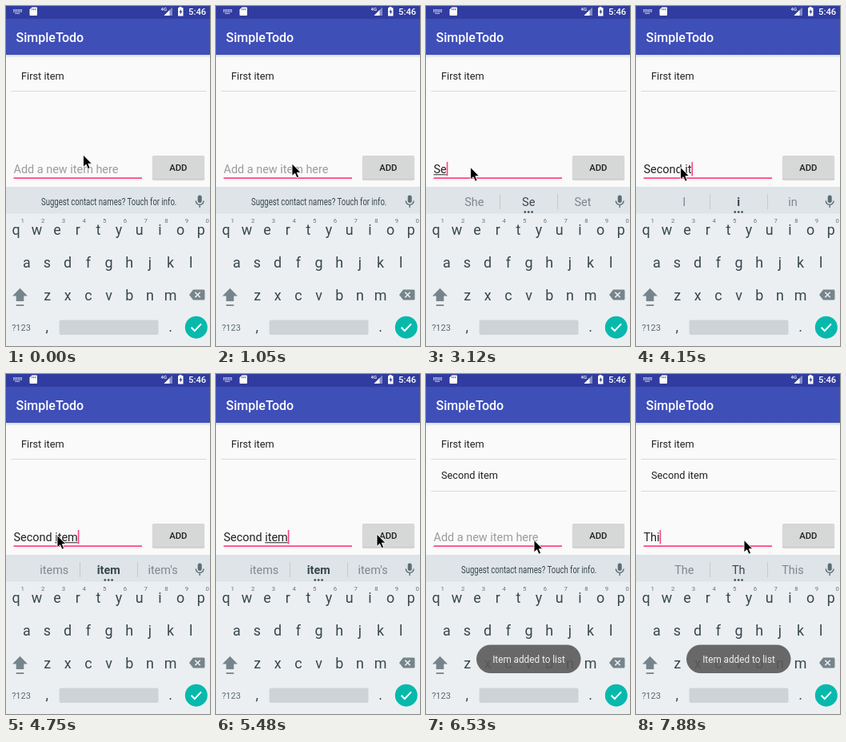
An HTML page for the animation above (8000 ms loop, 255 by 425 pixels).

```html
<!DOCTYPE html>
<html lang="en">
<head>
<meta charset="utf-8">
<title>Todo list</title>
<style>
html, body { margin: 0; width: 100%; height: 100%; overflow: hidden; background: #fafafa; }
svg { display: block; width: 100vw; height: 100vh; font-family: Roboto, sans-serif; }
text { white-space: pre; }
.mid { text-anchor: middle; }
.med { font-weight: 500; }
.item { font-size: 12.75px; fill: #212121; }
.field { font-size: 14.45px; }
.key { font-size: 17.9px; fill: #37474f; text-anchor: middle; }
.num { font-size: 7.8px; fill: #66757d; text-anchor: middle; }
</style>
</head>
<body>
<svg viewBox="0 0 255 425">
  <defs>
    <linearGradient id="shade" x2="0" y2="1">
      <stop stop-opacity=".14"/><stop offset="1" stop-opacity="0"/>
    </linearGradient>
  </defs>
  <rect width="255" height="425" fill="#fafafa"/>
  <rect y="61" width="255" height="4" fill="url(#shade)"/>
  <rect width="255" height="61" fill="#3f4fb8"/>
  <rect width="255" height="16" fill="#303c9f"/>

  <!-- status bar -->
  <g fill="#fff">
    <path d="M9 5h11M9 7.200h11M11.500 9.400h6" stroke="#fff" stroke-opacity=".85" stroke-width="1.300" stroke-dasharray="1.400 .6"/>
    <path d="M32.500 1.500H38q1 0 1 1V11q0 1-1 1H30.500q-1 0-1-1V4.500Z"/>
    <path d="M32.600 3.200v2M34.600 3.200v2M36.600 3.200v2" stroke="#303c9f" stroke-width=".9"/>
    <path d="M208 1.500V12H197.500Z" fill-opacity=".4"/>
    <path d="M204.500 5V12H197.500Z"/>
    <text x="193.500" y="6" font-size="6" class="med">4G</text>
    <path d="M216.500 1h3v1.200h2V12.500h-6.500V2.200h1.500Z"/>
    <path d="M218.800 3.800l-2.300 4h1.500v3l2.300-4.200h-1.500Z" fill="#303c9f"/>
    <text x="228" y="11" font-size="11.3" class="med">5:46</text>
    <text x="12.500" y="45" font-size="16" class="med">SimpleTodo</text>
  </g>

  <!-- list -->
  <text x="19" y="92" class="item">First item</text>
  <rect x="6.500" y="106" width="244" height="1" fill="#d8d8d8"/>
  <g id="second">
    <text x="19" y="131" class="item">Second item</text>
    <rect x="6.500" y="146" width="244" height="1" fill="#d8d8d8"/>
  </g>

  <!-- entry field -->
  <text id="hint" x="9.500" y="208.500" class="field" fill="#9b9b9b">Add a new item here</text>
  <text id="entry" x="9.500" y="208.500" class="field" fill="#212121"></text>
  <rect id="under" y="210.300" height="1" fill="#212121"/>
  <rect x="9.500" y="214.300" width="160.500" height="1.700" fill="#ff4081"/>
  <rect id="caret" y="195" width="1.600" height="17.500" fill="#ff4081"/>
  <rect x="182.700" y="188.200" width="65.600" height="30" rx="2" fill="#000" fill-opacity=".1"/>
  <rect x="183" y="187.300" width="65" height="30" rx="1.800" fill="#000" fill-opacity=".14"/>
  <rect x="183" y="187" width="65" height="29.500" rx="1.800" fill="#d6d7d7"/>
  <text x="215.300" y="206" font-size="11.3" class="mid med" fill="#212121">ADD</text>

  <!-- keyboard -->
  <rect y="226" width="255" height="199" fill="#eceff1"/>
  <rect y="226" width="255" height="33.500" fill="#dee4e7"/>
  <text id="ask" class="mid" transform="translate(128.700 249.200) scale(.737 1)" font-size="13" fill="#37474f">Suggest contact names? Touch for info.</text>
  <g id="words">
    <path d="M92.500 235v19M164.500 235v19" stroke="#c3ccd1"/>
    <text class="mid field" x="60.300" y="250" fill="#7b888f"></text>
    <text class="mid field" x="128.200" y="250" fill="#37474f"></text>
    <text class="mid field" x="196" y="250" fill="#7b888f"></text>
    <g fill="#37474f">
      <circle cx="123.800" cy="257.500" r="1.350"/><circle cx="128.200" cy="257.500" r="1.350"/><circle cx="132.600" cy="257.500" r="1.350"/>
    </g>
  </g>
  <rect x="239.700" y="236.500" width="5" height="9.500" rx="2.500" fill="#5d6d75"/>
  <path d="M237.300 243.500a4.900 4.900 0 0 0 9.800 0M242.200 248.400v3.600" fill="none" stroke="#5d6d75" stroke-width="1.400"/>
  <g id="keys"></g>
  <g fill="#76858c">
    <path d="M17.500 352.800L27 362.500H22.300V369H12.700V362.500H8Z"/>
    <rect x="12.700" y="373.200" width="9.600" height="1.800"/>
    <path d="M234 354.500H247q1.500 0 1.500 1.500V366q0 1.500-1.500 1.500H234L229 361Z"/>
  </g>
  <path d="M236.300 357.800l6.400 6.400M242.700 357.800l-6.400 6.400" stroke="#eceff1" stroke-width="1.600"/>
  <text x="19" y="405.500" font-size="11" class="mid" fill="#5a6a72">?123</text>
  <rect x="66.500" y="392.500" width="124" height="18.500" rx="2" fill="#cdd3d7"/>
  <circle cx="237.800" cy="401.700" r="14" fill="#07b9ac"/>
  <path d="M231.600 401.800l4.200 4.200 8.200-8.600" fill="none" stroke="#fff" stroke-width="2"/>

  <g id="toast">
    <rect x="63" y="338.500" width="130.500" height="35.500" rx="17.750" fill="#5a5a5a" fill-opacity=".9"/>
    <text class="mid" transform="translate(128.500 361) scale(.92 1)" font-size="12.75" fill="#f0f0f0">Item added to list</text>
  </g>
  <path id="mouse" d="M0 0V15.500L3.600 12.200 6 17.700 8.600 16.600 6.300 11.200H11Z" fill="#000" stroke="#fff" stroke-width=".9"/>
</svg>
<script>
const LOOP = 8000;
const $ = id => document.getElementById(id);
const slots = $('words').querySelectorAll('text');

function addKey(label, x, y, cls = 'key') {
  const el = document.createElementNS('http://www.w3.org/2000/svg', 'text');
  el.setAttribute('class', cls);
  el.setAttribute('x', x);
  el.setAttribute('y', y);
  el.textContent = label;
  $('keys').append(el);
}
const addRow = (letters, x, y, cls) =>
  [...letters].forEach((c, i) => addKey(c, x + i * 25.68, y, cls));

addRow('qwertyuiop', 12.7, 286);
addRow('asdfghjkl', 25.8, 327);
addRow('zxcvbnm', 51.6, 367.5);
addRow('1234567890', 20.6, 271, 'num');
addKey(',', 51.3, 407);
addKey('.', 205.7, 407);

// time, text, caret shown, start of underlined word (-1: none), suggestions
const typing = [
  [0, '', 0, -1, ''], [450, '', 1, -1, ''], [1050, '', 0, -1, ''],
  [1490, '', 1, -1, ''], [1940, '', 0, -1, ''], [2530, '', 1, -1, ''],
  [2680, 'S', 1, -1, ''], [2830, 'S', 1, 0, 'So S She'],
  [2970, 'Se', 1, -1, 'So S She'], [3120, 'Se', 1, 0, 'She Se Set'],
  [3270, 'Sec', 1, 0, 'See Sec Set'], [3410, 'Secon', 1, 0, 'See Sec Set'],
  [3560, 'Second', 1, 0, 'Sec *Second Set'], [3710, 'Second ', 1, -1, 'Sec *Second Set'],
  [4010, 'Second i', 1, 7, 'I *i in'], [4150, 'Second it', 1, -1, 'I *i in'],
  [4300, 'Second ite', 1, 7, 'it *item its'], [4450, 'Second item', 1, 7, "items *item item's"],
  [5050, 'Second item', 0, 7, "items *item item's"], [5480, 'Second item', 1, 7, "items *item item's"],
  [5780, '', 1, -1, ''], [6380, '', 0, -1, ''], [6830, '', 1, -1, ''],
  [7280, 'T', 1, -1, ''], [7430, 'T', 1, 0, 'To T The'],
  [7580, 'Th', 1, -1, 'To T The'], [7730, 'Th', 1, 0, 'The Th This'],
  [7880, 'Thi', 1, -1, 'The Th This']
];
// time, x, y
const moves = [
  [0, 96.5, 186], [1050, 95, 197], [1200, 84, 217], [1340, 70, 226],
  [1490, 60, 213], [1640, 55.5, 201.5], [4750, 64, 201.5], [4900, 108, 202],
  [5050, 164, 202], [5190, 199, 202], [5480, 201, 200],
  [6080, 196, 201], [6230, 168, 205], [6380, 143, 207], [6530, 135, 207.5]
];
// time, opacity
const fade = [[0, 0], [5930, 0.35], [6080, 0.75], [6230, 1]];

const at = (steps, t) => steps.findLast(s => s[0] <= t);
const show = (id, on) => $(id).setAttribute('visibility', on ? 'visible' : 'hidden');

function draw(t) {
  const [, text, caret, mark, words] = at(typing, t);
  const entry = $('entry');
  entry.textContent = text;
  const width = text ? entry.getComputedTextLength() : 0;
  show('hint', !text);
  show('caret', caret);
  $('caret').setAttribute('x', 9.5 + width);

  show('under', mark >= 0);
  if (mark >= 0) {
    const skip = mark ? entry.getSubStringLength(0, mark) : 0;
    $('under').setAttribute('x', 9.5 + skip);
    $('under').setAttribute('width', width - skip);
  }

  show('ask', !words);
  show('words', words);
  const list = words.split(' ');
  slots.forEach((slot, i) => {
    const word = list[i] || '';
    slot.textContent = word.replace('*', '');
    slot.setAttribute('font-weight', word[0] === '*' ? 700 : 400);
  });

  show('second', t >= 5780);
  $('toast').setAttribute('opacity', at(fade, t)[1]);
  const [, x, y] = at(moves, t);
  $('mouse').setAttribute('transform', `translate(${x} ${y})`);
}

const start = performance.now();
function tick() {
  draw((performance.now() - start) % LOOP);
  requestAnimationFrame(tick);
}
tick();
</script>
</body>
</html>
```
